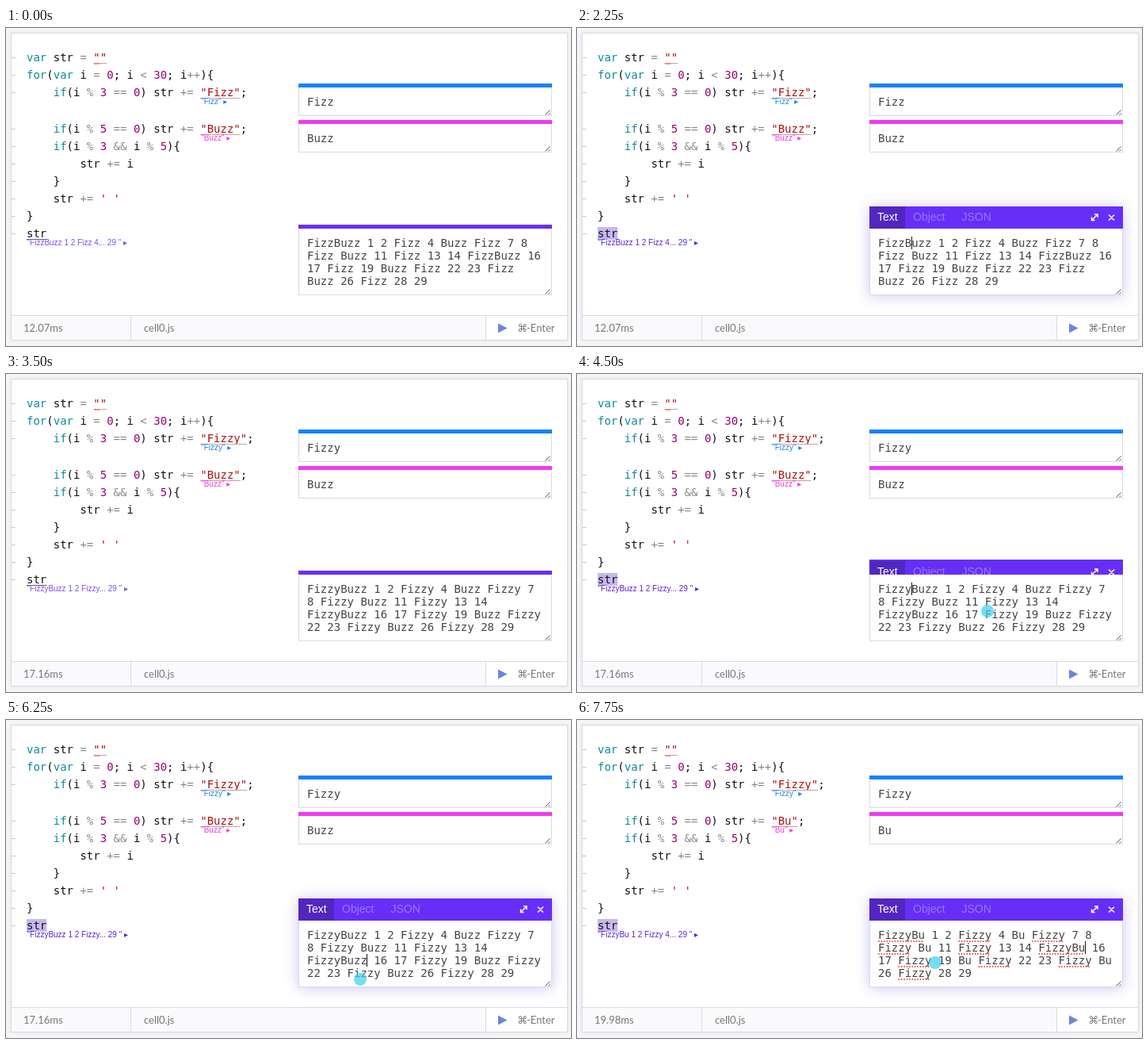
These frames come from a looping animation (713 px wide and 401 px high, 8000 ms). An HTML page:

```html
<!DOCTYPE html>
<html lang="en">
<head>
<meta charset="utf-8">
<title>FizzBuzz notebook cell</title>
<style>
  html, body { margin: 0; width: 100%; height: 100%; overflow: hidden; background: #f6f6f7; }
  svg { display: block; }
  .code, .out { font: 14px "DejaVu Sans Mono", monospace; }
  .code { fill: #111; }
  .out { fill: #444; }
  .kw { fill: #0b8a9c; }
  .num { fill: #990073; }
  .op { fill: #888; }
  .str { fill: #a11; }
  .note { font: 10px "Liberation Sans", "DejaVu Sans", sans-serif; }
  .tab { font: 14px "Liberation Sans", sans-serif; fill: #fff; }
  .dim { fill-opacity: .35; }
  .foot { font: 13px Lato, sans-serif; fill: #777; }
  .line { stroke: #dadaea; fill: none; }
  .box { stroke: #dadaea; fill: #fff; }
  .grip { stroke: #555; fill: none; }
  .icon { stroke: #fff; stroke-width: 1.5; fill: none; }
  .typo { stroke: #ee4a42; stroke-width: 2; stroke-linecap: round; stroke-dasharray: 0 3.4; }
  #card { filter: drop-shadow(0 0 2px rgba(60, 60, 110, .12)); }
  #glow { filter: drop-shadow(0 1px 9px rgba(80, 50, 200, .28)); }
</style>
</head>
<body>
<svg width="713" height="401" viewBox="0 0 713 401">
  <clipPath id="clip"><rect x="369" y="225" width="320" height="28"/></clipPath>

  <rect id="card" class="box" x="6.5" y="6.5" width="702" height="387"/>
  <rect x="7" y="363" width="598" height="30" fill="#fafafc"/>
  <path class="line" d="M7 362.5H708M157.5 363V393M605.5 363V393"/>
  <text id="ms" class="foot" x="22" y="383"/>
  <text class="foot" x="174" y="383">cell0.js</text>
  <path d="M621 372.5L632.5 378.5L621 384.5Z" fill="#6b85dd"/>
  <text x="645" y="383" font-size="13" font-family="DejaVu Sans, sans-serif" fill="#777">⌘</text>
  <text class="foot" x="657" y="383">-Enter</text>

  <g id="gutter"/>
  <rect id="mark" x="26" y="251" width="25.3" height="16" fill="#c8b6ee"/>
  <g id="code"/>

  <g id="small"/>
  <rect id="glow" x="369" y="225" width="320" height="112" fill="#fff"/>
  <rect class="box" x="369.5" y="248.5" width="319" height="88"/>
  <path class="grip" d="M680.5 335.5l6-6M684.5 335.5l2-2"/>
  <g clip-path="url(#clip)">
    <rect id="head" x="369" width="320" height="28" fill="#662ef6"/>
    <g id="tabs">
      <rect x="369" y="225" width="45" height="28" fill="#5226c1"/>
      <text class="tab" x="379" y="243">Text</text>
      <text class="tab dim" x="424" y="243">Object</text>
      <text class="tab dim" x="485.5" y="243">JSON</text>
      <path class="icon" d="M650 242L656.5 235.5M653 235H657V239M649.5 238.5V242.5H653.5M671 235.5L678 242.5M678 235.5L671 242.5"/>
    </g>
  </g>
  <circle id="ring" r="9" fill="none" stroke="#3cc4ee" stroke-opacity=".18"/>
  <g id="out"/>
  <rect id="caret" width="1" height="16" fill="#111"/>
  <circle id="dot" r="8" fill="#3ccdf0" fill-opacity=".7"/>
</svg>
<script>
const LOOP = 8000, STEP = 250, CHAR = 8.428, COLS = 35, LEFT = 26, OUT = 380;
const $ = id => document.getElementById(id);

// Each track is a list of [time, value]; a value holds until the next one.
const tracks = {
  fizz: [[0, 'Fizz'], [3250, 'Fizzy']],
  buzz: [[0, 'Buzz'], [6500, 'Buz'], [7750, 'Bu']],
  ms: [[0, '12.07ms'], [3250, '17.16ms'], [6500, '24.96ms'], [7750, '19.98ms']],
  drop: [[0, 23], [1000, 14], [1250, 3], [1500, 0], [2500, 9], [2750, 23], [4500, 9], [4750, 0]],
  glow: [[0, false], [1500, true], [2500, false], [4750, true]],
  typos: [[0, false], [7750, true]],
  caret: [[0, null], [1000, 8], [1750, 7], [2000, 6], [2250, 5], [2500, 4], [3000, null],
    [3250, 5], [3500, null], [4250, 5], [5000, null], [5250, 5], [5500, null],
    [6250, 'second'], [7000, null], [7250, 'second'], [7500, null], [7750, 'second']],
  dot: [[0, null], [500, [500, 340]], [750, [470, 314]], [1000, [447, 296]], [1250, null],
    [4000, [548, 377]], [4250, [530, 335]], [4500, [518, 299]], [4750, [532, 297]],
    [5000, [544, 299]], [5250, [528, 301]], [5500, [500, 302]], [5750, [472, 311]],
    [6000, [447, 327]], [6500, null], [7750, [452, 306]]],
  ring: [[0, null], [1250, [447, 296]], [1500, null], [6500, [447, 327]], [7000, null]]
};

function stateAt(t) {
  const s = {};
  for (const key in tracks) s[key] = tracks[key].filter(k => k[0] <= t).pop()[1];
  return s;
}

const rows = [37, 59, 81, 127, 149, 171, 193, 215, 237, 259];
const source = (fizz, buzz) => [
  'var str = ""',
  'for(var i = 0; i < 30; i++){',
  `    if(i % 3 == 0) str += "${fizz}";`,
  `    if(i % 5 == 0) str += "${buzz}";`,
  '    if(i % 3 && i % 5){',
  '        str += i',
  '    }',
  "    str += ' '",
  '}',
  'str'
];

const esc = s => s.replace(/&/g, '&amp;').replace(/</g, '&lt;');
const text = (cls, x, y, body, fill) =>
  `<text class="${cls}" x="${x}" y="${y}"${fill ? ` style="fill:${fill}"` : ''}>${body}</text>`;
const rule = (x, y, chars, color) =>
  `<path d="M${x} ${y}h${chars * CHAR}" stroke="${color}"/>`;

function paint(line) {
  const token = /(\b(?:var|for|if)\b)|("[^"]*"|'[^']*')|(\d+)|([%=<+&]+)|[\w\s]|./g;
  return line.replace(token, (m, kw, str, num, op) => {
    const cls = kw ? 'kw' : str ? 'str' : num ? 'num' : op ? 'op' : '';
    return cls ? `<tspan class="${cls}">${esc(m)}</tspan>` : m;
  });
}

function fizzBuzz(fizz, buzz) {
  let str = '';
  for (let i = 0; i < 30; i++) {
    if (i % 3 == 0) str += fizz;
    if (i % 5 == 0) str += buzz;
    if (i % 3 && i % 5) str += i;
    str += ' ';
  }
  return str;
}

function wrap(str) {
  const lines = [];
  for (const word of str.trim().split(' ')) {
    const last = lines.length - 1;
    if (last >= 0 && lines[last].length + 1 + word.length <= COLS) lines[last] += ' ' + word;
    else lines.push(word);
  }
  return lines;
}

function drawCode(s, result, open) {
  const quoted = ['#f0553c', null, '#1d86e8', '#ee3ce6'];
  $('code').innerHTML = source(s.fizz, s.buzz).map((line, i) => {
    const y = rows[i] + 5, body = line.trimStart();
    let svg = text('code', LEFT + (line.length - body.length) * CHAR, y, paint(body));
    const lit = line.match(/"[^"]*"/);
    if (lit) {
      const x = LEFT + lit.index * CHAR;
      svg += rule(x, y + 2.5, lit[0].length, '#c9a0a0');
      svg += text('note', x + 1, y + 10, lit[0] + (i ? ' ▸' : ''), quoted[i]);
    }
    return svg;
  }).join('') + (open ? '' : rule(LEFT, 266.5, 3, '#555')) +
    text('note', LEFT + .5, 274, `"${result.slice(0, 19)}...${result.slice(-4)}" ▸`, open ? '#5a22dc' : '#7c50ee');
}

function smallBox(y, color, value) {
  return `<rect class="box" x="369.5" y="${y + .5}" width="319" height="40"/>` +
    `<rect x="369" y="${y}" width="320" height="5" fill="${color}"/>` +
    `<path class="grip" d="M680.5 ${y + 39.5}l6-6M684.5 ${y + 39.5}l2-2"/>` +
    text('out', OUT, y + 28, value);
}

function drawOutput(lines, typos) {
  $('out').innerHTML = lines.map((line, i) => {
    const y = 276 + i * 16;
    let svg = text('out', OUT, y, line);
    if (typos) for (const m of line.matchAll(/Fizz\w*/g)) {
      svg += `<path class="typo" d="M${OUT + 1 + m.index * CHAR} ${y + 3}h${m[0].length * CHAR - 2}"/>`;
    }
    return svg;
  }).join('');
}

function place(id, pos) {
  $(id).style.display = pos ? '' : 'none';
  if (pos) $(id).setAttribute('transform', `translate(${pos})`);
}

function caretPos(s, result, lines) {
  if (s.caret === null) return null;
  const both = s.fizz + s.buzz;
  let col = s.caret === 'second' ? result.indexOf(both, 1) + both.length : s.caret;
  let row = 0;
  while (col > lines[row].length) col -= lines[row++].length + 1;
  return [Math.round(OUT + col * CHAR - .5), 263 + row * 16];
}

function draw(t) {
  const s = stateAt(t), open = s.drop < 23;
  const result = fizzBuzz(s.fizz, s.buzz), lines = wrap(result);
  $('ms').textContent = s.ms;
  $('mark').style.display = open ? '' : 'none';
  $('glow').style.display = s.glow ? '' : 'none';
  $('head').setAttribute('y', 225 + s.drop);
  $('tabs').setAttribute('transform', `translate(0 ${s.drop * 1.22})`);
  drawCode(s, result, open);
  $('small').innerHTML = smallBox(70, '#1782fc', s.fizz) + smallBox(116, '#f03af0', s.buzz);
  drawOutput(lines, s.typos);
  place('caret', caretPos(s, result, lines));
  place('dot', s.dot);
  place('ring', s.ring);
}

$('gutter').innerHTML = rows.map(y => `<path d="M7 ${y + .5}h5" stroke="#cfc4cc"/>`).join('');

const start = performance.now();
let shown = -1;
function tick() {
  const step = Math.floor((performance.now() - start) % LOOP / STEP);
  if (step !== shown) draw((shown = step) * STEP);
  requestAnimationFrame(tick);
}
tick();
</script>
</body>
</html>
```
